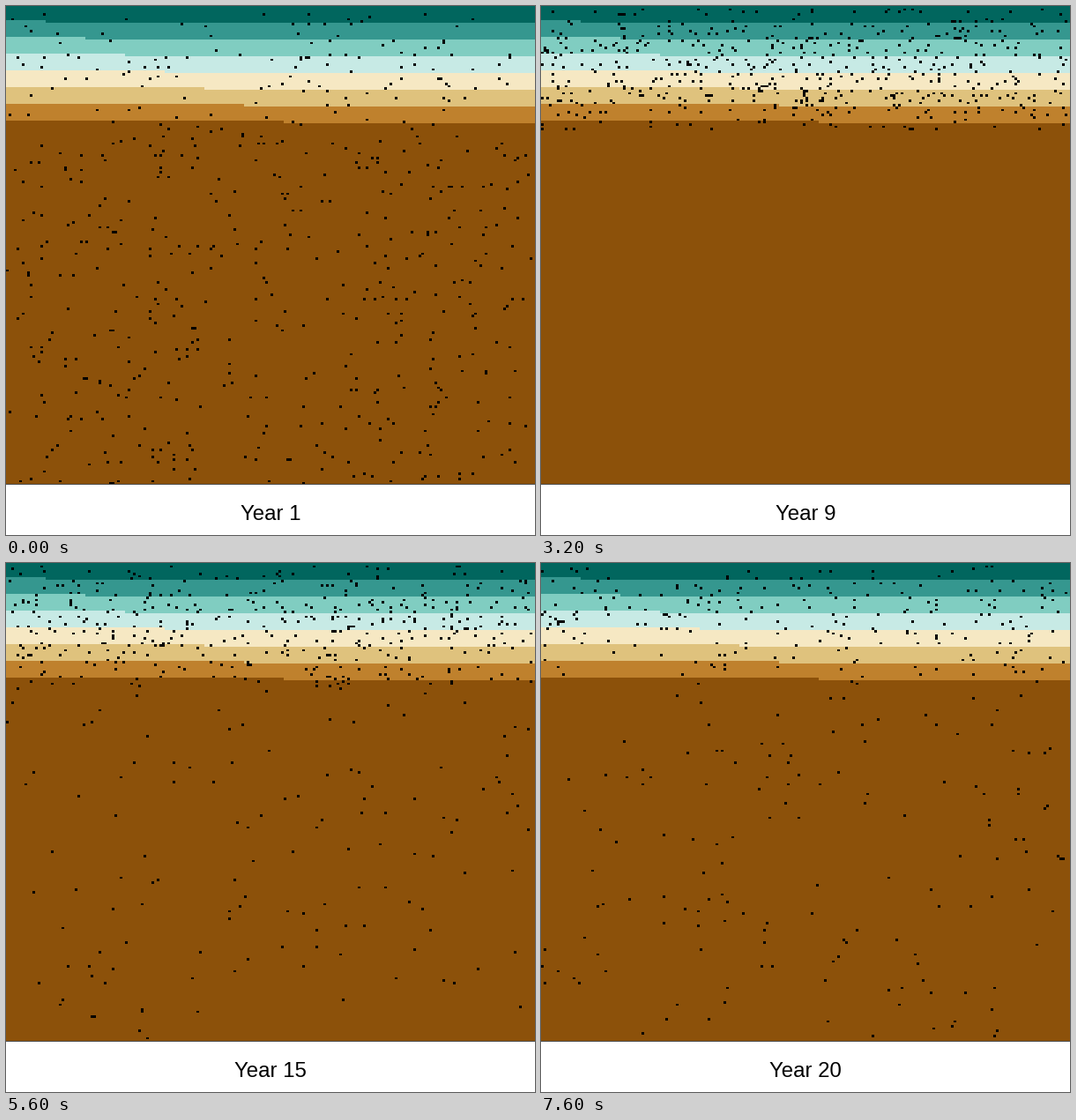
Recreate the animation shown at these times as a matplotlib script. Size 600 by 600 pixels, loop 8000 ms.

```python
import numpy as np
import matplotlib.pyplot as plt
from matplotlib.animation import FuncAnimation
from matplotlib.colors import ListedColormap
from matplotlib.patches import Rectangle

SIZE, DPI = 600, 100
CELLS = 200
YEARS, INTERVAL = 20, 400
MAP_HEIGHT = 543
BAND_CELLS = 1385
COLORS = ["#8c510a", "#bf812d", "#dfc27d", "#f6e8c3", "#c7eae5",
          "#80cdc1", "#35978f", "#01665e", "#000000"]
BLACK = len(COLORS) - 1
BASE_CELLS = CELLS * CELLS - (BLACK - 1) * BAND_CELLS
BASE_ROW = 52  # first row scattered as part of the brown base

# Dot totals drift between a few key years.
KEY_YEARS = [1, 4, 6, 9, 13, 17, 20]
BAND_DOTS = [130, 225, 300, 510, 325, 480, 225]
BASE_DOTS = [425, 175, 130, 0, 145, 112, 145]


def make_bands():
    """Fill the grid row by row from the bottom, one colour after another."""
    order = np.arange(CELLS * CELLS).reshape(CELLS, CELLS)[::-1]
    return np.where(order < BASE_CELLS, 0, 1 + (order - BASE_CELLS) // BAND_CELLS)


def scatter(grid, rng, rows, weights, count):
    """Blacken count distinct cells; the last column stays free."""
    width = CELLS - 1
    chance = np.repeat(weights / weights.sum() / width, width)
    picks = rng.choice(chance.size, int(round(count)), replace=False, p=chance)
    grid[rows[picks // width], picks % width] = BLACK


def year_grid(year):
    rng = np.random.default_rng(100 + year)
    grid = BANDS.copy()
    upper, lower = np.arange(1, BASE_ROW), np.arange(BASE_ROW, CELLS)
    profile = 0.45 + 0.55 * np.sin(np.pi * upper / BASE_ROW)
    scatter(grid, rng, upper, profile, np.interp(year, KEY_YEARS, BAND_DOTS))
    scatter(grid, rng, lower, np.ones(lower.size),
            np.interp(year, KEY_YEARS, BASE_DOTS))
    return grid


BANDS = make_bands()

fig = plt.figure(figsize=(SIZE / DPI, SIZE / DPI), dpi=DPI, facecolor="white")
ax = fig.add_axes([0, 1 - MAP_HEIGHT / SIZE, 1, MAP_HEIGHT / SIZE])
ax.axis("off")
image = ax.imshow(BANDS, cmap=ListedColormap(COLORS), vmin=-0.5, vmax=BLACK + 0.5,
                  interpolation="nearest", aspect="auto")
fig.add_artist(Rectangle((0, SIZE - MAP_HEIGHT), SIZE, 1, transform=None,
                         facecolor="#4d4d4d", linewidth=0, antialiased=False))
label = fig.text(300.4 / SIZE, 17 / SIZE, "", ha="center", va="baseline",
                 color="black", family="Liberation Sans", fontsize=24 * 72 / DPI)


def update(frame):
    year = frame + 1
    image.set_data(year_grid(year))
    label.set_text(f"Year {year}")
    return image, label


animation = FuncAnimation(fig, update, frames=YEARS, interval=INTERVAL,
                          repeat=True, repeat_delay=0, blit=False)
plt.show()
```
